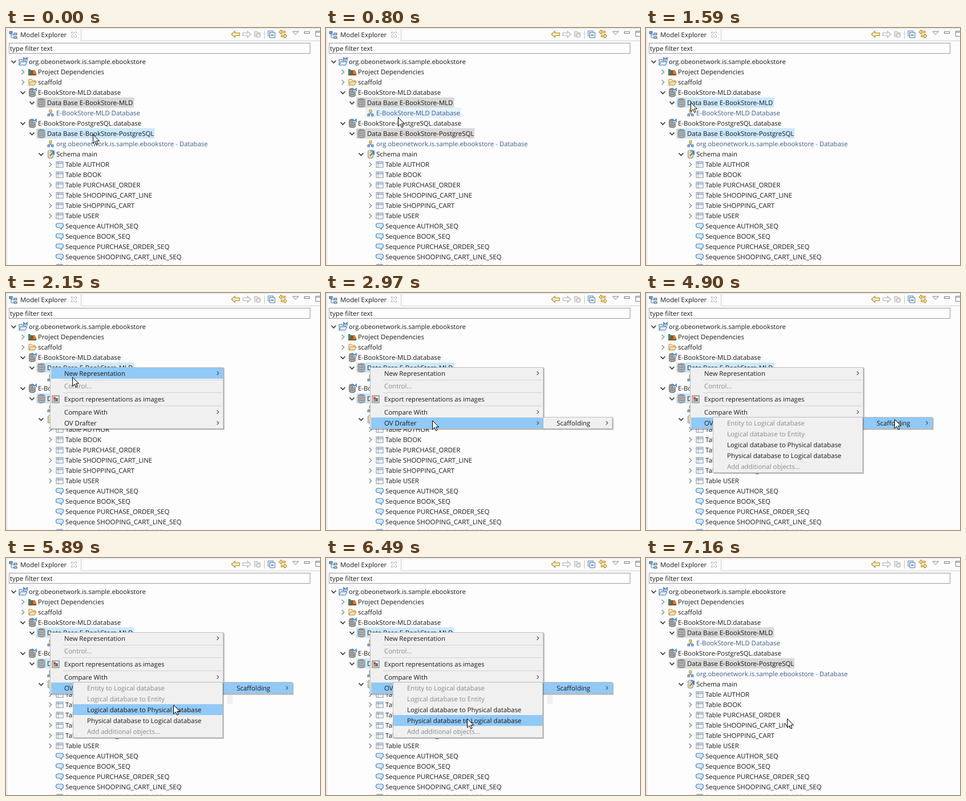
Write an HTML page that moves like this. It is 550 px wide and 415 px high and loops after 8000 ms.

```html
<!DOCTYPE html>
<html lang="en">
<head>
<meta charset="utf-8">
<title>Model Explorer</title>
<style>
  html, body { margin: 0; width: 550px; height: 415px; overflow: hidden; background: #fdfdfd; }
  svg { display: block; }
  text { font-family: "Open Sans", "Noto Sans", sans-serif; text-rendering: geometricPrecision; white-space: pre; }
</style>
</head>
<body>
<svg id="stage" width="550" height="415" viewBox="0 0 550 415"></svg>
<script>
const LOOP = 8000;
const SELECTED = "#cce8ff", INACTIVE = "#d9d9d9", HOVER = "#e5f3ff", MENU_HOT = "#91c9f7";
const INK = "#1a1a1a", LINK = "#3d5b8a", DISABLED = "#8b8b8b";

const rect = (x, y, w, h, fill, more = "") =>
  `<rect x="${x}" y="${y}" width="${w}" height="${h}" fill="${fill}" ${more}/>`;
const path = (d, stroke, width = 1, fill = "none") =>
  `<path d="${d}" stroke="${stroke}" stroke-width="${width}" fill="${fill}"/>`;
const label = (x, y, str, fill = INK, size = 11.45) =>
  `<text x="${x}" y="${y + 4}" font-size="${size}" fill="${fill}">${str}</text>`;
const group = (id, body) => `<g id="${id}">${body}</g>`;
const at = (x, y, body) => `<g transform="translate(${x} ${y})">${body}</g>`;

// Tree icons, drawn around their centre
const cylinder = (w, fill, edge, ring) =>
  path(`M${-w} -5V5C${-w} 8 ${w} 8 ${w} 5V-5C${w} -8 ${-w} -8 ${-w} -5Z`, edge, 1, fill) +
  [-5, -1, 3].map(y => path(`M${-w} ${y}C${-w} ${y + 3} ${w} ${y + 3} ${w} ${y}`, ring, .9)).join("");
const modelMark = rect(0, -8, 7.5, 6, "#eef4fa") + path("M1 -2V-7L4 -4L7 -7V-2", "#3f74a8", 1.4);
const icons = {
  project: path("M-7 6V-4H-2L0 -2H5V0", "#3f75ad", 1, "#d7e8f8") +
    path("M-7 6L-4 0H7L4 6Z", "#3f75ad", 1, "#e6eefa") + modelMark,
  books: rect(-7, -5, 4, 9, "#2a8f7c") + rect(-3, -3, 4, 7, "#a8452c") +
    path("M1 -2L4 -3L7 4H2Z", "#8b5a1e", 1, "#d98a36") + rect(-7, 4, 14, 2, "#7c5526"),
  folder: path("M-6 5V-5H-1L1 -3H5V-1", "#b9812f", 1, "#fdf0cb") +
    path("M-6 5L-3 -1H7L4 5Z", "#b9812f", 1, "#ffe2a0"),
  file: cylinder(5.5, "#8c8c8c", "#6e6e6e", "#cfcfcf") + modelMark,
  database: cylinder(6, "#9a9a9a", "#7c7c7c", "#d2d2d2"),
  diagram: path("M0 -1V2M-4 4V1H4V4", "#6a7f9c") + rect(-2, -5.5, 4, 4, "#f2d68a", 'stroke="#a88a3a"') +
    rect(-5, 2, 3.5, 3, "#9dbce0", 'stroke="#5379a4"') + rect(1.5, 2, 3.5, 3, "#9dbce0", 'stroke="#5379a4"'),
  schema: cylinder(4.5, "#f2e3bb", "#8b8f96", "#b8a67a") +
    path("M-1 3L5 -4M0 -5.5H6V1", "#2f74b0", 1.7),
  table: rect(-6, -5, 12, 10, "#fff", 'stroke="#76889d"') + rect(-5.5, -4.5, 11, 2.5, "#c3d1e2") +
    path("M-6 -1.5H6M-2.5 -5V5", "#8fa2b8") + path("M-5 1.5H6M2 -1V5", "#dfe7ef"),
  sequence: path("M-3 -5H3Q6.5 -5 6.5 -1.5Q6.5 2.5 3.5 2.5L3 5.5L0 2.5H-3Q-6.5 2.5 -6.5 -1.5Q-6.5 -5 -3 -5Z",
    "#4f88b8", 1.2, "#d3e7f9")
};

// [depth, chevron, icon, text, style]
const tree = [
  [0, "open", "project", "org.obeonetwork.is.sample.ebookstore", { size: 11.23 }],
  [1, "shut", "books", "Project Dependencies"],
  [1, "shut", "folder", "scaffold"],
  [1, "open", "file", "E-BookStore-MLD.database"],
  [2, "open", "database", "Data Base E-BookStore-MLD"],
  [3, "", "diagram", "E-BookStore-MLD Database", { fill: LINK }],
  [1, "open", "file", "E-BookStore-PostgreSQL.database", { size: 11.35 }],
  [2, "open", "database", "Data Base E-BookStore-PostgreSQL"],
  [3, "", "diagram", "org.obeonetwork.is.sample.ebookstore - Database", { fill: LINK, size: 11.3 }],
  [3, "open", "schema", "Schema main"],
  ...["AUTHOR", "BOOK", "PURCHASE_ORDER", "SHOOPING_CART_LINE", "SHOPPING_CART", "USER"]
    .map(name => [4, "shut", "table", "Table " + name, { size: 11.4 }]),
  ...["AUTHOR", "BOOK", "PURCHASE_ORDER", "SHOOPING_CART_LINE", "SHOPPING_CART"]
    .map(name => [4, "", "sequence", `Sequence ${name}_SEQ`])
];
const rowY = i => 59 + 18 * i;
const chevrons = {
  open: path("M-4 -2L0 2.2L4 -2", "#404040", 1.7),
  shut: path("M-2 -4L2.2 0L-2 4", "#8c8c8c", 1.4)
};
const treeRow = ([depth, chevron, icon, str, style = {}], i) => {
  const x = 40 + 16 * depth, y = rowY(i);
  return (chevron ? at(x - 26.5, y, chevrons[chevron]) : "") +
    at(x - 10, y, icons[icon]) + label(x, y, str, style.fill, style.size);
};

// Rows that can be highlighted: index -> [left, right]
const barSpan = { 4: [53, 224.5], 5: [69, 237], 6: [37, 238], 7: [53, 260] };
const bars = Object.entries(barSpan).map(([i, [l, r]]) =>
  rect(l, rowY(+i) - 9.5, r - l, 18, "none", `id="bar${i}"`)).join("");

const arrow = (stroke, fill) => path("M-7 0L-1 -5.5V-2.5H7V2.5H-1V5.5Z", stroke, 1.2, fill);
const header =
  path("M131.5 2V22.5H550", "#cfcfd4") + path("M1.5 0V415", "#d4d4d8") + path("M1 1.5H550", "#e2e2e5") +
  at(13, 12, path("M-4 -3V5H1M-4 0H1", "#5d7fa8") + rect(-7, -6, 5, 4, "#7fa9d6", 'stroke="#35618f"') +
    rect(1, -3, 5, 3, "#bcd6ee", 'stroke="#35618f"') + rect(1, 3, 5, 3, "#bcd6ee", 'stroke="#35618f"')) +
  label(25, 12, "Model Explorer") +
  at(119, 11.5, path("M-4.5 -4.5H-2L0 -2L2 -4.5H4.5V-2L2 0L4.5 2V4.5H2L0 2L-2 4.5H-4.5V2L-2 0L-4.5 -2Z", "#b0b0b0", 1, "#fff")) +
  at(402, 11, arrow("#b5872e", "#fdf0c4")) +
  at(422, 11, `<g transform="scale(-1 1)">${arrow("#b4b4b4", "#f8f8f8")}</g>`) +
  at(440, 11, path("M-5 4V-5H0L1 -3H5V4Z", "#b9b9b9", 1, "#e4e4e4") +
    `<circle cx="2" cy="2" r="3.5" fill="#eee" stroke="#a8a8a8"/>`) +
  path("M452.5 4V19", "#c4c4c4") +
  at(465, 11, rect(-6, -6, 9, 9, "#dbeaf8", 'stroke="#5c8abb"') + rect(-3, -3, 9, 9, "#fff", 'stroke="#3f73a8"') +
    path("M-1 1.5H4", "#2a568c", 1.4)) +
  at(485, 10, path("M-7 -3L-3 -7V-4.5H4V-1.5H-3V1Z M7 4L3 8V5.5H-3V2.5H3V0Z", "#b07d1a", 1, "#fbdd8b")) +
  path("M502 6H512.5L507.2 11.5Z", "#7c7c7c", 1, "#fff") +
  rect(522.5, 6.5, 9, 3, "#fff", 'stroke="#7c7c7c"') +
  rect(542.5, 5.5, 9, 9, "#fff", 'stroke="#7c7c7c"') + path("M542 7.5H550", "#7c7c7c") +
  rect(5.5, 26.5, 527, 18, "#fff", 'stroke="#9a9a9a"') + label(7, 36, "type filter text", INK, 11.5);

// Context menus
const panel = (x, y, w, h) =>
  rect(x + 2, y + 2, w, h, "#000", 'opacity=".14"') + rect(x + 1, y + 1, w, h, "#000", 'opacity=".2"') +
  rect(x + .5, y + .5, w - 1, h - 1, "#f0f0f0", 'stroke="#bdbdbd"');
const more = (x, y) => at(x, y, path("M-1.5 -3L1.5 0L-1.5 3", "#505050", 1.1));
const hot = id => rect(79, 0, 301, 19, MENU_HOT, `id="${id}"`);
const contextMenu = panel(77, 130, 304, 108) + hot("menuHot") +
  [152.5, 174.5, 197.5].map(y => path(`M100 ${y}H379`, "#d2d2d2")).join("") +
  label(102, 141, "New Representation", INK, 11.3) + more(371, 140.5) +
  label(102, 163, "Control...", DISABLED) +
  at(87, 186, rect(-6, -6, 12, 12, "#f4efe6", 'stroke="#6a5a55"') + rect(-4, -4, 4, 5, "#c25a44") +
    rect(0, -2, 4, 6, "#4c79b4") + rect(-4, 2, 4, 2, "#8c7768")) +
  label(102, 186, "Export representations as images", INK, 11.27) +
  label(102, 209, "Compare With", INK, 11.35) + more(371, 208.5) +
  label(102, 228, "OV Drafter") + more(371, 227.5);
const scaffoldMenu = panel(380, 217, 122, 21) + rect(381, 218, 120, 19, MENU_HOT, 'id="scaffoldHot"') +
  label(404, 228, "Scaffolding") + more(492, 227.5);
const actions = ["Entity to Logical database", "Logical database to Entity", "Logical database to Physical database",
  "Physical database to Logical database", "Add additional objects..."];
const actionY = i => 228 + 19 * i;
const actionMenu = panel(117, 217, 263, 98) + rect(118, 0, 261, 19, MENU_HOT, 'id="actionHot"') +
  actions.map((str, i) => label(142, actionY(i), str, i === 2 || i === 3 ? INK : DISABLED)).join("");
const chosen = rect(118, 275, 261, 19, MENU_HOT) + label(142, actionY(3), actions[3]);

const stage = document.getElementById("stage");
stage.innerHTML = header + bars + tree.map(treeRow).join("") +
  group("residue", rect(387, 240, 10, 16, "#f0f0f0")) +
  group("context", contextMenu) + group("scaffold", scaffoldMenu) +
  group("action", actionMenu) + group("chosen", chosen) +
  group("pointer", path("M.5 .5V16L4.2 12.6L6.7 18L9 17L6.6 11.7H11.6Z", "#000", 1, "#fff"));
const el = Object.fromEntries([...stage.querySelectorAll("[id]")].map(n => [n.id, n]));

// Pointer moves: [start, steps, x, y], one step every 120 ms
const moves = [
  [650, 1, 139, 164], [800, 4, 87, 130], [1440, 1, 78, 130], [2030, 2, 116, 147],
  [2270, 3, 177, 207], [2670, 1, 186, 223], [3240, 3, 328, 223], [3640, 2, 437, 221],
  [4900, 1, 435, 221], [5020, 3, 386, 233], [5410, 7, 256, 266], [6250, 3, 247, 281]
];
function pointerAt(t) {
  let x = 152, y = 186;
  for (const [start, steps, toX, toY] of moves) {
    if (t < start) break;
    const k = Math.min(1, (Math.floor((t - start) / 120) + 1) / steps);
    x += (toX - x) * k;
    y += (toY - y) * k;
  }
  return [Math.round(x), Math.round(y)];
}

const show = (node, opacity) => {
  node.style.display = opacity > 0 ? "" : "none";
  node.style.opacity = opacity;
};
const stepped = (t, steps) => steps.reduce((value, [time, next]) => t >= time ? next : value, 0);
const highlight = (node, centre) => {
  show(node, centre ? 1 : 0);
  if (centre) node.setAttribute("y", centre - 10);
};

function draw(t) {
  const [x, y] = pointerAt(t);
  el.pointer.setAttribute("transform", `translate(${x} ${y})`);

  const focused = t >= 1590 && t < 6900;
  const hoverRow = t < 1590 ? Math.round((y - 59) / 18) : -1;
  for (const i of [4, 5, 6, 7]) {
    const selected = i === 4 || i === 7, hovered = i === hoverRow;
    const fill = selected ? (focused || hovered ? SELECTED : INACTIVE) : hovered ? HOVER : "none";
    el["bar" + i].setAttribute("fill", fill);
  }

  show(el.context, t >= 1890 && t < 6900 ? 1 : 0);
  const hotItem = t < 2030 ? 0 : t >= 2670 ? 228 :
    [141, 186, 209].find(centre => Math.abs(y - centre + .5) <= 10);
  highlight(el.menuHot, hotItem);

  show(el.scaffold, stepped(t, [[2820, .7], [2970, 1], [6900, 0]]));
  show(el.scaffoldHot, t >= 3640 ? 1 : 0);

  show(el.action, stepped(t, [[4280, .4], [4400, .75], [4520, 1], [6900, 0]]));
  highlight(el.actionHot, t < 5410 ? 0 : [266, 285].find(centre => Math.abs(y - centre) <= 9.5));
  show(el.residue, t >= 5410 && t < 6900 ? 1 : 0);
  show(el.chosen, stepped(t, [[6900, .7], [7040, .35], [7160, 0]]));
}

function frame(now) {
  draw(now % LOOP);
  requestAnimationFrame(frame);
}
draw(0);
requestAnimationFrame(frame);
</script>
</body>
</html>
```
